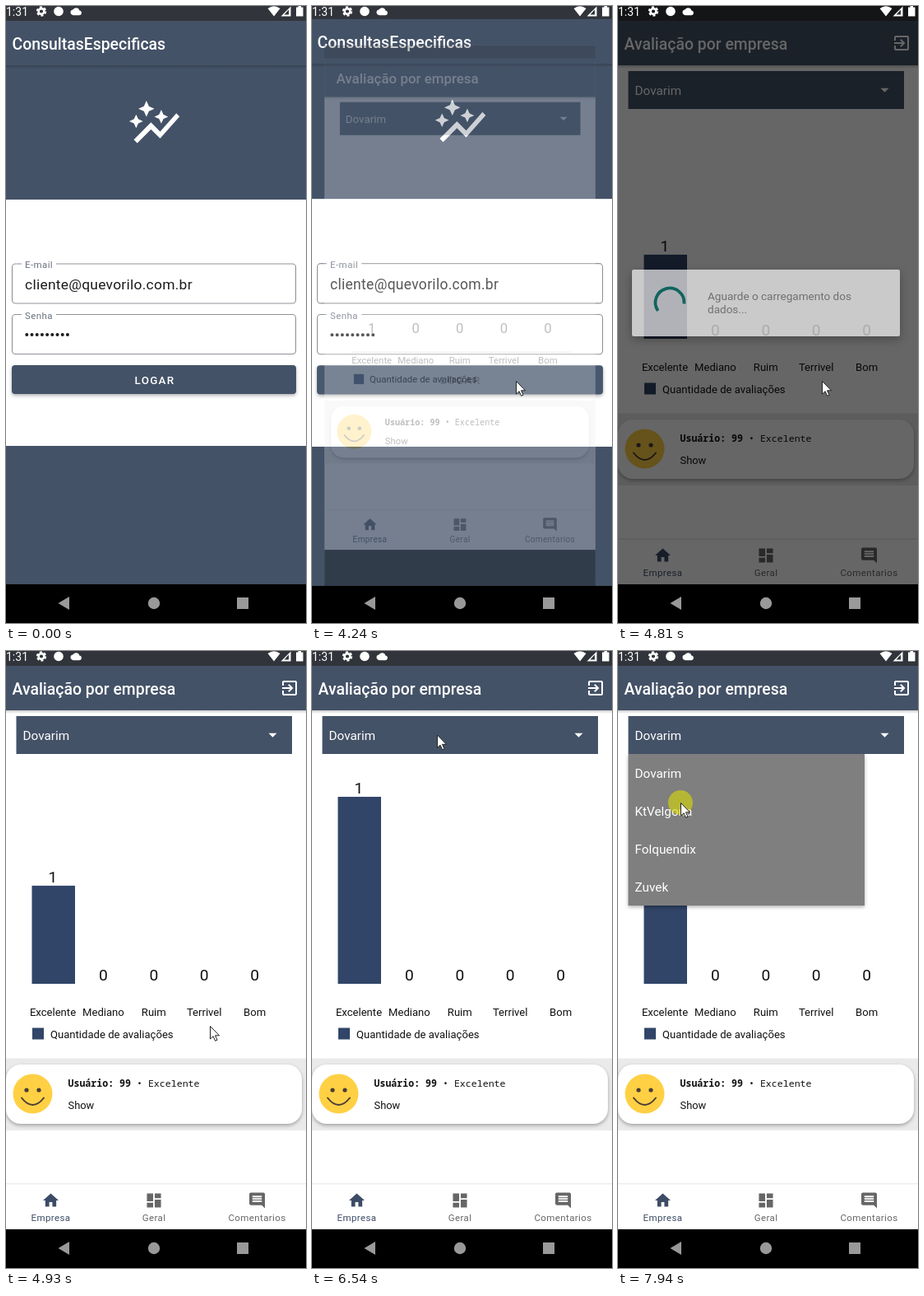
These frames come from a looping animation (365 by 749 pixels, 7990 ms). An HTML page:

```html
<!DOCTYPE html>
<html lang="pt-BR">
<head>
<meta charset="utf-8">
<style>
  html, body { margin: 0; width: 100%; height: 100%; overflow: hidden; background: #000; }
  svg { display: block; width: 365px; height: 749px; font-family: Roboto, sans-serif; }
  .mono { font-family: "Noto Sans Mono", monospace; }
  .soft { filter: drop-shadow(0 2px 2px rgba(0,0,0,.3)); }
  .deep { filter: drop-shadow(0 4px 6px rgba(0,0,0,.4)); }
</style>
</head>
<body>
<svg id="stage" viewBox="0 0 365 749"></svg>
<script>
const LOOP = 7990, BLUE = '#445267', BAR = '#304568', BASE = 404;

const rect = (x, y, w, h, fill, more = '') =>
  `<rect x="${x}" y="${y}" width="${w}" height="${h}" fill="${fill}" ${more}/>`;
const text = (x, y, size, str, fill = '#111', more = '') =>
  `<text x="${x}" y="${y}" font-size="${size}" fill="${fill}" ${more}>${str}</text>`;
const icon = (x, y, scale, d, fill = '#fff', more = '') =>
  `<path transform="translate(${x} ${y}) scale(${scale})" d="${d}" fill="${fill}" ${more}/>`;
const mid = 'text-anchor="middle"';

// Window chrome shared by both screens
const screen = (title, bg) =>
  rect(-9, 0, 378, 749, bg) +
  rect(-9, 72, 378, 4, 'url(#shade)') +
  rect(-9, 0, 378, 72, BLUE) + rect(-9, 0, 378, 18, '#31343a') +
  text(7.5, 52.5, 19.4, title, '#fff', 'font-weight="500"') +
  rect(-9, 702, 378, 60, '#000');

const field = (y, label) =>
  rect(7.5, y, 345, 48, '#fff', 'rx="4" stroke="#909298" stroke-width="1.1"') +
  rect(19, y - 2, 42, 4, '#fff') +
  text(23, y + 5.2, 11.5, label, '#6a7280', 'letter-spacing=".4"');

const login = screen('ConsultasEspecificas', BLUE) +
  icon(147.2, 109.4, 2.78, 'M14.06 9.94 12 9l2.06-.94L15 6l.94 2.06L18 9l-2.06.94L15 12zM4 14l.94-2.06L7 11l-2.06-.94L4 8l-.94 2.06L1 11l2.06.94zM8.5 9l1.09-2.41L12 5.5 9.59 4.41 8.5 2 7.41 4.41 5 5.5l2.41 1.09zM4.5 20.5l6-6.01 4 4L23 8.93l-1.41-1.41-7.09 7.97-4-4L3 19z') +
  rect(-9, 235, 378, 299, '#fff') +
  field(313, 'E-mail') + field(374.5, 'Senha') +
  text(23, 344, 17.4, 'cliente@quevorilo.com.br', '#1c1c1c', 'letter-spacing=".28"') +
  '<path d="M25.3 399h50" stroke="#1c1c1c" stroke-width="4" stroke-linecap="round" stroke-dasharray="0 6.2"/>' +
  rect(7, 436, 346, 35, BLUE, 'rx="4" class="soft" id="button"') +
  text(181, 458.8, 13.4, 'LOGAR', '#fff', mid + ' font-weight="500" letter-spacing="1.3" id="buttonText"');

const columns = ['Excelente', 'Mediano', 'Ruim', 'Terrivel', 'Bom'];
const chart = columns.map((name, i) => {
  const x = 57 + i * 61.4;
  return text(x, 443, 13.1, name, '#111', mid) +
    text(x, 400, 19.2, i ? 0 : 1, '#111', mid + (i ? '' : ' id="barValue"'));
}).join('') +
  rect(31.5, BASE, 52.5, 0, BAR, 'id="bar"') +
  rect(28, 426.5, 306, 1, '#aaa', 'id="axis"') +
  rect(32, 457.5, 14, 14, BAR) + text(54, 469.5, 13.1, 'Quantidade de avaliações');

const tab = (x, label, d, fill) =>
  icon(x - 11.4, 655.6, .95, d, fill) +
  text(x, 692, 11.5, label, fill, mid + ' letter-spacing=".4"');

const home = screen('Avaliação por empresa', '#fff') +
  icon(333, 33, 1, 'M10.09 15.59L11.5 17l5-5-5-5-1.41 1.41L12.67 11H3v2h9.67zM19 3H5c-1.11 0-2 .9-2 2v4h2V5h14v14H5v-4H3v4c0 1.1.89 2 2 2h14c1.1 0 2-.9 2-2V5c0-1.1-.9-2-2-2z', '#fff', 'id="exit"') +
  rect(12.5, 79, 335.5, 46, BLUE) + text(20.5, 108.3, 15.3, 'Dovarim', '#fff') +
  '<path d="M319.5 99.7h10l-5 5z" fill="#fff"/>' + chart +
  rect(-9, 494.5, 378, 87.5, '#eaeaea') +
  rect(0, 502, 360, 72, '#fff', 'rx="18" class="soft"') +
  `<circle cx="32.5" cy="537.5" r="24" fill="#ffd044"/>
   <circle cx="25" cy="533" r="2.6" fill="#493d38"/><circle cx="40" cy="533" r="2.6" fill="#493d38"/>
   <path d="M19 542.5q13.5 17 27 0" fill="none" stroke="#493d38" stroke-width="2" stroke-linecap="round"/>` +
  text(75.5, 529, 11.6, '<tspan font-weight="700">Usuário: 99</tspan> • Excelente', '#111', 'class="mono"') +
  text(75.5, 555.5, 12.9, 'Show') +
  rect(-9, 646, 378, 1.5, '#ededed') +
  tab(54.5, 'Empresa', 'M10 20v-6h4v6h5v-8h3L12 3 2 12h3v8z', '#3d4c66') +
  tab(180, 'Geral', 'M3 13h8V3H3zm0 8h8v-6H3zm10 0h8V11h-8zm0-18v6h8V3z', '#666') +
  tab(305.5, 'Comentarios', 'M22 4c0-1.1-.9-2-2-2H4c-1.1 0-2 .9-2 2v12c0 1.1.9 2 2 2h14l4 4zM18 14H6v-2h12zm0-3H6V9h12zm0-3H6V6h12z', '#666');

const dialog = rect(17, 320, 326, 81, '#f9f9f9', 'rx="2" class="deep"') +
  '<path id="loader" fill="none" stroke="#12867a" stroke-width="3.8"/>' +
  text(109, 357, 13.55, 'Aguarde o carregamento dos', '#757575') +
  text(109, 373.3, 13.55, 'dados...', '#757575');

const popup = rect(12.5, 125, 287.5, 184, '#7f7f7f', 'class="soft"') +
  ['Dovarim', 'KtVelgona', 'Folquendix', 'Zuvek']
    .map((name, i) => text(20.5, 154.3 + 46 * i, 15.3, name, '#fff')).join('');

const system = text(0, 11.6, 14, '1:31', '#fff') +
  `<g fill="none" stroke="#fff"><circle cx="43" cy="6.5" r="3.4" stroke-width="2.6"/>
   <circle cx="43" cy="6.5" r="5.2" stroke-width="2" stroke-dasharray="3 2.445"/></g>
   <circle cx="64" cy="6.5" r="5.8" fill="#fff"/>` +
  icon(78.5, 0, .56, 'M19.35 10.04A7.49 7.49 0 0 0 12 4C9.11 4 6.6 5.64 5.35 8.04A6 6 0 0 0 0 14c0 3.31 2.69 6 6 6h13c2.76 0 5-2.24 5-5 0-2.64-2.05-4.78-4.65-4.96z') +
  `<path d="M318.500 3q7.500-5.500 15 0L326 12.500zM353 1.500h2.500V0h3.500v1.500h2.500v11H353z" fill="#fff"/>
   <path d="M346.500 .5v12h-12z" fill="#fff"/><path d="M344 4.500v6h-5.500z" fill="#31343a"/>
   <g fill="#999"><path d="M63.500 725l13.500-8v16z"/><circle cx="180" cy="725" r="7.2"/>${rect(281, 718, 14, 14, '#999')}</g>`;

stage.innerHTML = `
  <defs>
    <linearGradient id="shade" x2="0" y2="1"><stop stop-opacity=".2"/><stop offset="1" stop-opacity="0"/></linearGradient>
    <clipPath id="reveal"><rect id="revealBox" x="0" y="125" width="320" height="190"/></clipPath>
  </defs>
  <g id="loginScreen">${login}</g>
  <g id="homeScreen">${home}</g>
  <g id="popupBox" clip-path="url(#reveal)">${popup}</g>
  ${rect(0, 0, 365, 749, '#000', 'id="dim"')}
  <g id="dialogBox">${dialog}</g>
  ${system}
  <circle id="press" cx="76" cy="184" r="15" fill="#d8d808" opacity=".62"/>
  <path id="pointer" d="M.5.5v15.500l3.600-3.300 2.500 5.600 2.400-1.100-2.500-5.400h5z" fill="#fff" stroke="#222" stroke-width="1"/>`;

const el = id => document.getElementById(id);
const set = (id, attrs) => { for (const k in attrs) el(id).setAttribute(k, attrs[k]); };
const show = (id, on) => set(id, { visibility: on ? 'visible' : 'hidden' });
const linear = u => u, easeOut = u => 1 - (1 - u) ** 2, easeBoth = u => u * u * (3 - 2 * u);

// Value at time t along [time, value] stops
function track(t, stops, ease = linear) {
  if (t <= stops[0][0]) return stops[0][1];
  for (let i = 1; i < stops.length; i++) {
    const [t0, a] = stops[i - 1], [t1, b] = stops[i];
    if (t < t1) return a + (b - a) * ease((t - t0) / (t1 - t0));
  }
  return stops[stops.length - 1][1];
}
const zoom = (s, y = 374) => `translate(180 ${y}) scale(${s}) translate(-180 ${-y})`;

function pointerAt(t) {
  if (t < 5400) return [
    track(t, [[560, 364], [1400, 248]], easeOut),
    track(t, [[560, 730], [1400, 455]], easeOut)];
  if (t < 7100) return [
    track(t, [[5400, 248], [5870, 192], [6200, 163], [6540, 152]]),
    track(t, [[5400, 455], [5870, 162], [6200, 90], [6540, 101.500]])];
  return [
    track(t, [[7130, 152], [7900, 76]], easeBoth),
    track(t, [[7130, 101.500], [7900, 184]], easeBoth)];
}

function render(t) {
  const pressed = t >= 2030, opened = t >= 4240;
  set('button', { fill: pressed ? '#48586e' : BLUE });
  set('buttonText', { fill: pressed ? '#2c3646' : '#fff' });
  set('loginScreen', { transform: zoom(track(t, [[4220, 1], [4360, 1.04], [4540, 1.06]])) });
  show('loginScreen', t < 4600);

  show('homeScreen', opened);
  set('homeScreen', {
    opacity: track(t, [[4220, 0], [4300, 1]]),
    transform: zoom(track(t, [[4220, .85], [4300, .935], [4360, .966], [4540, 1]]))
  });
  set('exit', { opacity: t < 4480 ? 0 : 1 });
  set('axis', { opacity: t < 4480 ? 1 : 0 });

  const height = track(t, [[4370, 0], [4810, 102], [4930, 119], [5890, 227]]);
  set('bar', { y: BASE - height, height });
  set('barValue', { y: BASE - 4 - height });

  set('dim', { opacity: track(t, [[4280, 0], [4360, .34], [4480, .6], [4820, .6], [4925, 0]]) });
  set('dialogBox', {
    opacity: track(t, [[4280, 0], [4360, .95], [4420, 1], [4760, 1], [4810, .69], [4910, 0]]),
    transform: zoom(track(t, [[4280, .93], [4360, .969], [4480, 1]]), 360.5)
  });
  const point = deg => {
    const a = deg * Math.PI / 180;
    return `${63 + 17.5 * Math.cos(a)} ${360 + 17.5 * Math.sin(a)}`;
  };
  const from = track(t, [[4240, -7], [4930, 177]]), to = track(t, [[4240, 264], [4930, 386]]);
  set('loader', { d: `M${point(from)}A17.5 17.5 0 ${to - from > 180 ? 1 : 0} 1 ${point(to)}` });

  set('popupBox', { opacity: track(t, [[6740, 0], [6930, 1]]) });
  set('revealBox', { height: track(t, [[6740, 40], [6990, 190]], easeOut) });
  show('press', t >= 7930);
  show('pointer', t >= 570);
  set('pointer', { transform: `translate(${pointerAt(t)})` });
}

function tick() {
  render(performance.now() % LOOP);
  requestAnimationFrame(tick);
}
tick();
</script>
</body>
</html>
```
